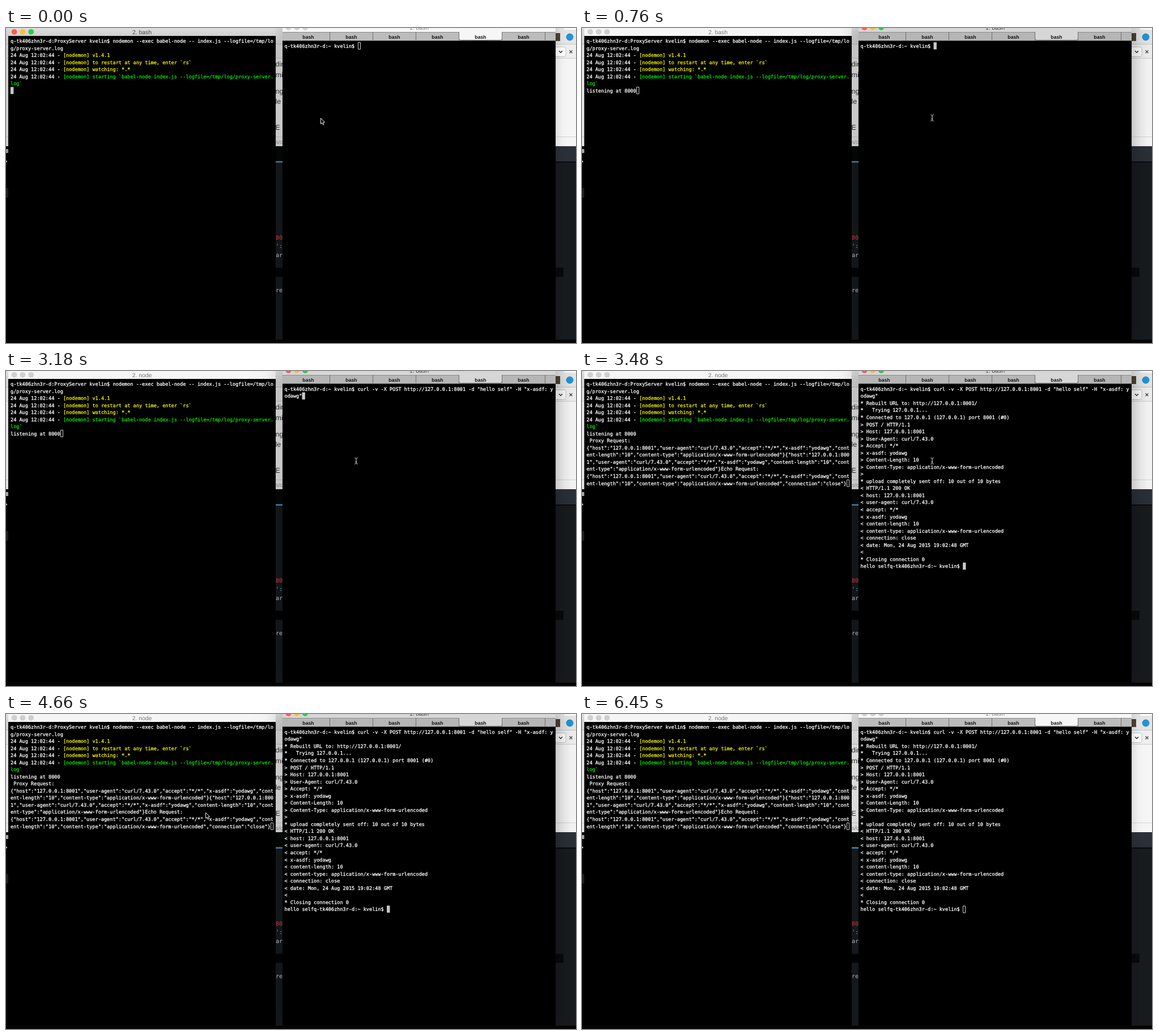
Animation of 1006x557 px, one loop 6.55 s. Source, as an HTML page with a canvas:

```html
<!DOCTYPE html>
<html lang="en">
<head>
<meta charset="utf-8">
<title>Proxy demo</title>
<style>
  html, body { margin: 0; width: 100%; height: 100%; overflow: hidden; background: #000; }
  canvas { display: block; }
</style>
</head>
<body>
<canvas id="stage" width="1006" height="557"></canvas>
<script>
const ctx = document.getElementById('stage').getContext('2d');
const LOOP = 6550, CELL = 5.16, ROW = 12.54;
const MONO = '"DejaVu Sans Mono", monospace', SANS = '"Liberation Sans", sans-serif';

const machine = 'q-tk406zhn3r-d', user = 'kvelin';
const prompt = machine + ':~ ' + user + '$ ';
const command = 'curl -v -X POST http://127.0.0.1:8001 -d "hello self" -H "x-asdf: yodawg"';
const stamp = '24 Aug 12:02:44 - ';
const fields = '{"host":"127.0.0.1:8001","user-agent":"curl/7.43.0","accept":"*/*","x-asdf":"yodawg",' +
  '"content-length":"10","content-type":"application/x-www-form-urlencoded"';

const serverStart = [
  machine + ':ProxyServer ' + user + '$ nodemon --exec babel-node -- index.js --logfile=/tmp/log/proxy-server.log',
  stamp + '[nodemon] v1.4.1',
  stamp + '[nodemon] to restart at any time, enter `rs`',
  stamp + '[nodemon] watching: *.*',
  stamp + '[nodemon] starting `babel-node index.js --logfile=/tmp/log/proxy-server.log`'
];
const serverLog = [' Proxy Request:', fields + '}' + fields + '}Echo Request:', fields + ',"connection":"close"}'];
const reply = `* Rebuilt URL to: http://127.0.0.1:8001/
*   Trying 127.0.0.1...
* Connected to 127.0.0.1 (127.0.0.1) port 8001 (#0)
> POST / HTTP/1.1
> Host: 127.0.0.1:8001
> User-Agent: curl/7.43.0
> Accept: */*
> x-asdf: yodawg
> Content-Length: 10
> Content-Type: application/x-www-form-urlencoded
>
* upload completely sent off: 10 out of 10 bytes
< HTTP/1.1 200 OK
< host: 127.0.0.1:8001
< user-agent: curl/7.43.0
< accept: */*
< x-asdf: yodawg
< content-length: 10
< content-type: application/x-www-form-urlencoded
< connection: close
< date: Mon, 24 Aug 2015 19:02:48 GMT
<
* Closing connection 0
hello self${prompt}`.split('\n');

// Pointer steps: start time, shape, x, y (arrow tip or beam centre)
const pointer = [
  [0, 'arrow', 555, 159], [140, 'arrow', 617, 156], [320, 'arrow', 618, 155], [620, 'arrow', 617, 156],
  [760, 'beam', 618, 159], [4080, 'beam', 587, 159], [4220, 'arrow', 453, 139], [4370, 'arrow', 440, 142],
  [4520, 'arrow', 357, 174], [4660, 'arrow', 352, 174], [5110, 'beam', 495.5, 266], [5260, 'beam', 835.5, 478],
  [5410, 'beam', 848, 480], [5560, 'beam', 962, 541.5], [5700, 'none', 0, 0]
];

function rect(x, y, w, h, color) {
  ctx.fillStyle = color;
  ctx.fillRect(x, y, w, h);
}

function disc(x, y, r, color) {
  ctx.fillStyle = color;
  ctx.beginPath();
  ctx.arc(x, y, r, 0, 7);
  ctx.fill();
}

function text(str, x, y, font, color, align = 'left', weight = 0) {
  ctx.font = font;
  ctx.fillStyle = ctx.strokeStyle = color;
  ctx.textAlign = align;
  ctx.fillText(str, x, y);
  if (!weight) return;
  ctx.lineWidth = weight;
  ctx.strokeText(str, x, y);
}

function line(color, width, ...points) {
  ctx.strokeStyle = color;
  ctx.lineWidth = width;
  ctx.beginPath();
  points.forEach(([x, y]) => ctx.lineTo(x, y));
  ctx.stroke();
}

function vertical(y, h, from, to) {
  const g = ctx.createLinearGradient(0, y, 0, y + h);
  g.addColorStop(0, from);
  g.addColorStop(1, to);
  return g;
}

function backdrop() {
  rect(0, 0, 1006, 209, '#f6f6f6');
  rect(0, 0, 1006, 28, '#e6e6e6');
  rect(985, 0, 21, 3, '#fbfbfb');
  rect(0, 28, 1006, 1, '#c4c4c4');
  rect(0, 29, 1006, 24, '#efefef');
  rect(0, 53, 1006, 1, '#cccccc');
  rect(0, 192, 1006, 1, '#d6d6d6');

  rect(964, 9, 14, 14, '#4a4234');
  disc(995, 16, 6.5, '#2493d6');
  ctx.fillStyle = '#fff';
  ctx.beginPath();
  ctx.roundRect(960, 33.5, 28, 17, 3);
  ctx.fill();
  ctx.strokeStyle = '#c4c4c4';
  ctx.lineWidth = 1;
  ctx.stroke();
  line('#333', 1.6, [976, 40.5], [979, 43.5], [982, 40.5]);
  line('#444', 1.3, [994.5, 39.5], [999.5, 44.5]);
  line('#444', 1.3, [999.5, 39.5], [994.5, 44.5]);

  rect(0, 209, 1006, 348, '#181b1e');
  rect(0, 209, 488, 26, '#050607');
  rect(970, 209, 36, 27, '#2a3037');
  rect(970, 236, 36, 2, '#08090a');
  rect(476, 235.5, 12, 2.5, '#5590c2');
  rect(0, 209, 5, 348, '#050505');
  rect(0, 214, 4, 7, '#b5b5b5');
  rect(0, 283, 4, 17, '#222');
  ctx.fillStyle = '#ddd';
  ctx.beginPath();
  ctx.moveTo(0, 234);
  ctx.lineTo(2.5, 236);
  ctx.lineTo(0, 238);
  ctx.fill();
  rect(476, 424, 12, 16, '#020202');
  rect(970, 424, 14, 16, '#08090a');
}

// Page and editor text that shows in the gap between the two windows
function gapText() {
  ctx.save();
  ctx.beginPath();
  ctx.rect(476, 0, 12, 551);
  ctx.clip();
  [['din', 68], ['mis', 87], ['ng', 116], ['le', 134], ['E', 180]]
    .forEach(([s, y]) => text(s, 475.5, y, '12.5px ' + SANS, '#2c2c2c'));
  text('s/c', 476, 205, '10px ' + SANS, '#808080');
  [['80', 373.5, '#c8393b'], ["':", 388.5, '#5fb3cc'], ['ar', 404.5, '#b8b8b8'], ['re', 466.5, '#b8b8b8']]
    .forEach(([s, y, c]) => text(s, 476, y, '10px ' + MONO, c));
  ctx.restore();
}

function windowFrame(x, y, w, h, focused) {
  ctx.save();
  ctx.shadowColor = focused ? 'rgba(0,0,0,.36)' : 'rgba(0,0,0,.2)';
  ctx.shadowBlur = focused ? 34 : 18;
  ctx.shadowOffsetY = focused ? 8 : 4;
  rect(x, y, w, h, '#000');
  ctx.restore();
}

function lights(x, y, focused) {
  ['#fc5b57', '#fdbc40', '#34c84a'].forEach((c, i) => disc(x + i * 14.8, y, 4.9, focused ? c : '#cfcfcf'));
}

function terminal(x, y, columns, lines, focused) {
  const write = (str, tx, ty, color) => text(str, tx, ty, '8.57px ' + MONO, color, 'left', .3);
  let row = 0, end = 0;
  for (const str of lines) {
    const stamped = str.startsWith(stamp);
    const tint = str.includes('starting') ? '#00e800' : '#f4f400';
    for (let i = 0; i === 0 || i < str.length; i += columns, row++) {
      const part = str.slice(i, i + columns);
      const plain = !stamped ? columns : i === 0 ? stamp.length : 0;
      const base = y + 3.2 + row * ROW;
      write(part.slice(0, plain), x, base, '#fff');
      write(part.slice(plain), x + plain * CELL, base, tint);
      end = part.length;
    }
  }
  const cx = x + end * CELL, cy = y - 6.3 + (row - 1) * ROW;
  if (focused) return rect(cx, cy, 5.4, 12.5, '#c9c9c9');
  ctx.strokeStyle = '#d0d0d0';
  ctx.lineWidth = 1;
  ctx.strokeRect(Math.round(cx) + .5, Math.round(cy) + .5, 4, 12);
}

function serverWindow(t) {
  const focused = t < 760;
  windowFrame(4, 0, 472, 551, focused);
  rect(4, 0, 472, 14, focused ? vertical(0, 14, '#dedede', '#cfcfcf') : '#f5f5f5');
  lights(14.6, 6.8, focused);
  text(t < 3180 ? '2. bash' : '2. node', 240, 10.5, '10.4px ' + SANS, focused ? '#444' : '#777', 'center');
  const lines = [...serverStart, t < 470 ? '' : 'listening at 8000'];
  if (t >= 3480) lines.push(...serverLog);
  terminal(8, 22.8, 90, lines, focused);
}

function clientWindow(t) {
  const focused = t >= 760 && t < 6450;
  const bar = focused ? '#d6d6d6' : '#f6f6f6';
  windowFrame(488, -16, 482, 567, focused);
  rect(488, 0, 482, 7, bar);
  text('1. bash', 729, 3, '10.4px ' + SANS, focused ? '#444' : '#888', 'center');
  lights(498.5, -1, focused);
  rect(488, 7, 482, 16, focused ? '#b6b6b6' : '#bcbcbc');
  rect(488, 7, 482, 1, '#8a8a8a');
  rect(488, 22, 482, 1, '#555');
  for (let i = 0; i < 6; i++) rect(571 + i * 76, 7, 1, 16, '#6c6c6c');
  ctx.fillStyle = bar;
  ctx.strokeStyle = '#6c6c6c';
  ctx.lineWidth = 1;
  ctx.beginPath();
  ctx.roundRect(799.5, 5, 76, 16.5, [0, 0, 3, 3]);
  ctx.fill();
  ctx.stroke();
  rect(798, 4, 79, 3, bar);
  for (let i = 0; i < 6; i++) text('bash', 533.5 + i * 76, 18.5, 'bold 8.7px ' + SANS, '#111', 'center');

  const typed = t < 1810 ? 0 : t < 2430 ? 6 : command.length;
  const lines = [prompt + command.slice(0, typed)];
  if (t >= 3480) lines.push(...reply);
  terminal(491.5, 31.6, 92, lines, focused);
}

const shapes = {
  arrow() {
    ctx.beginPath();
    [[.5, .5], [.5, 10.6], [2.8, 8.5], [4.4, 12.3], [6.1, 11.5], [4.6, 7.9], [7.6, 7.7]]
      .forEach(([x, y]) => ctx.lineTo(x, y));
    ctx.closePath();
    ctx.fillStyle = '#000';
    ctx.fill();
    ctx.strokeStyle = '#eee';
    ctx.lineWidth = 1;
    ctx.stroke();
  },
  beam() {
    line('#ddd', 1.1, [0, -4.5], [0, 4.5]);
    for (const s of [-1, 1]) line('#ddd', 1, [-2.6, 5.4 * s], [-1, 5.2 * s], [0, 4.2 * s], [1, 5.2 * s], [2.6, 5.4 * s]);
    line('#ddd', 1, [-1.4, 2], [1.4, 2]);
  },
  none() {}
};

function draw(now) {
  const t = now % LOOP;
  ctx.textRendering = 'geometricPrecision';
  ctx.lineJoin = 'round';
  backdrop();
  serverWindow(t);
  clientWindow(t);
  gapText();
  rect(0, 551, 1006, 6, '#050505');
  const [, shape, x, y] = pointer.findLast(step => step[0] <= t);
  ctx.save();
  ctx.translate(x, y);
  shapes[shape]();
  ctx.restore();
}

const start = performance.now();
(function tick() {
  draw(performance.now() - start);
  requestAnimationFrame(tick);
})();
</script>
</body>
</html>
```
